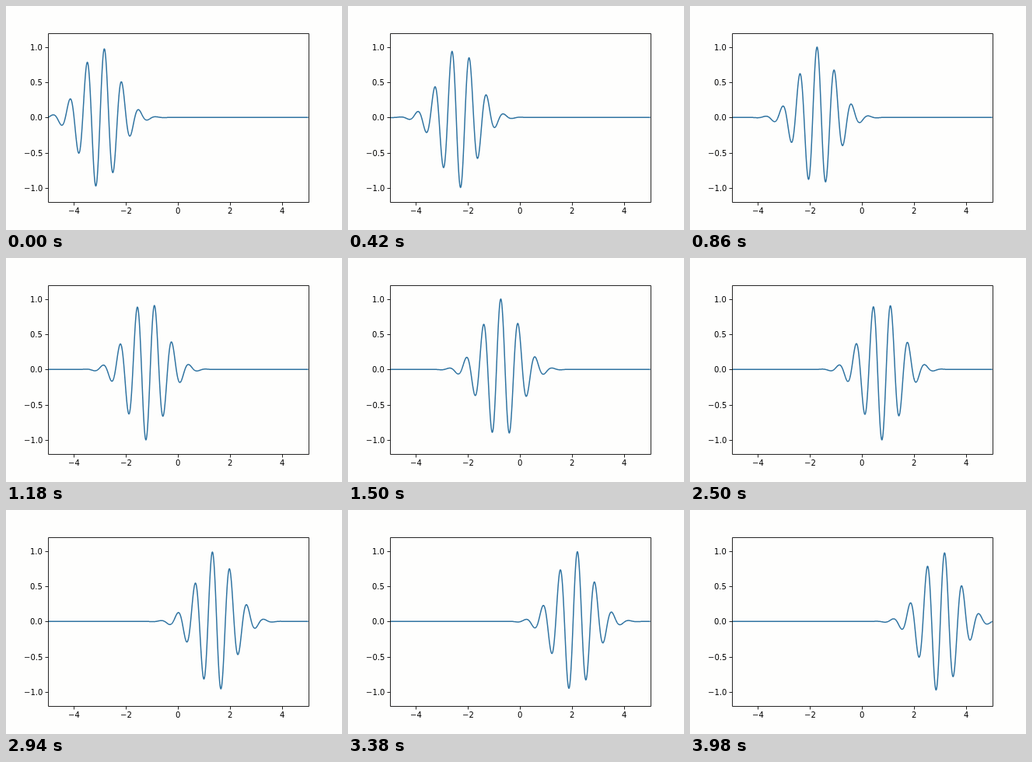
These frames come from a looping animation (432x288 px, 4 s). An HTML page:

```html
<!DOCTYPE html>
<html lang="en">
<head>
<meta charset="utf-8">
<title>Travelling wave packet</title>
<style>
  html, body { margin: 0; width: 100%; height: 100%; overflow: hidden; background: #fefefd; }
  svg { display: block; width: 432px; height: 288px; }
  text { font: 10px "DejaVu Sans", sans-serif; fill: #000; }
  .axis { fill: none; stroke: #000; stroke-width: .85; }
  #wave { fill: none; stroke: #2f73a1; stroke-width: 1.5; stroke-linejoin: round; }
</style>
</head>
<body>
<svg id="plot" viewBox="0 0 432 288">
  <clipPath id="area"><rect x="54" y="34.56" width="334.8" height="217.44"/></clipPath>
  <path id="wave" clip-path="url(#area)"/>
  <path class="axis" d="M54.5 35.5H389.5V252.5H54.5Z"/>
</svg>
<script>
const STEP = 20, STEPS = 200, SAMPLES = 1000;
const plot = document.getElementById('plot');
const wave = document.getElementById('wave');
const px = x => 221.4 + x * 33.48;
const py = y => 143.28 - y * 90.6;

function add(tag, attrs) {
  const el = document.createElementNS('http://www.w3.org/2000/svg', tag);
  for (const key in attrs) el.setAttribute(key, attrs[key]);
  return plot.appendChild(el);
}

// Labels start on a whole pixel; align is the share of the width left of x.
function label(str, x, y, align) {
  const el = add('text', { y });
  el.textContent = str.replace('-', '\u2212');
  el.setAttribute('x', Math.round(x - align * el.getComputedTextLength()));
}

for (const v of [-4, -2, 0, 2, 4]) {
  add('path', { class: 'axis', d: `M${Math.round(px(v)) + .5} 252.5v4` });
  label(String(v), px(v), 267, .5);
}
for (const v of [-1, -.5, 0, .5, 1]) {
  const y = Math.round(py(v));
  add('path', { class: 'axis', d: `M54.5 ${y + .5}h-4` });
  label(v.toFixed(1), 47, y + 4, 1);
}

// Gaussian envelope centred on c; the carrier moves at a third of its speed.
function draw(c) {
  let d = '';
  for (let i = 0; i <= SAMPLES; i++) {
    const x = -5 + 10 * i / SAMPLES;
    const y = Math.exp(-((x - c) ** 2)) * Math.sin(Math.PI * (3 * x - c));
    d += (i ? 'L' : 'M') + px(x).toFixed(2) + ' ' + py(y).toFixed(2);
  }
  wave.setAttribute('d', d);
}

const start = performance.now();
function tick() {
  const n = Math.floor(Math.max(0, performance.now() - start) / STEP) % STEPS;
  draw(-3 + 6 * n / (STEPS - 1));
  requestAnimationFrame(tick);
}
tick();
</script>
</body>
</html>
```
